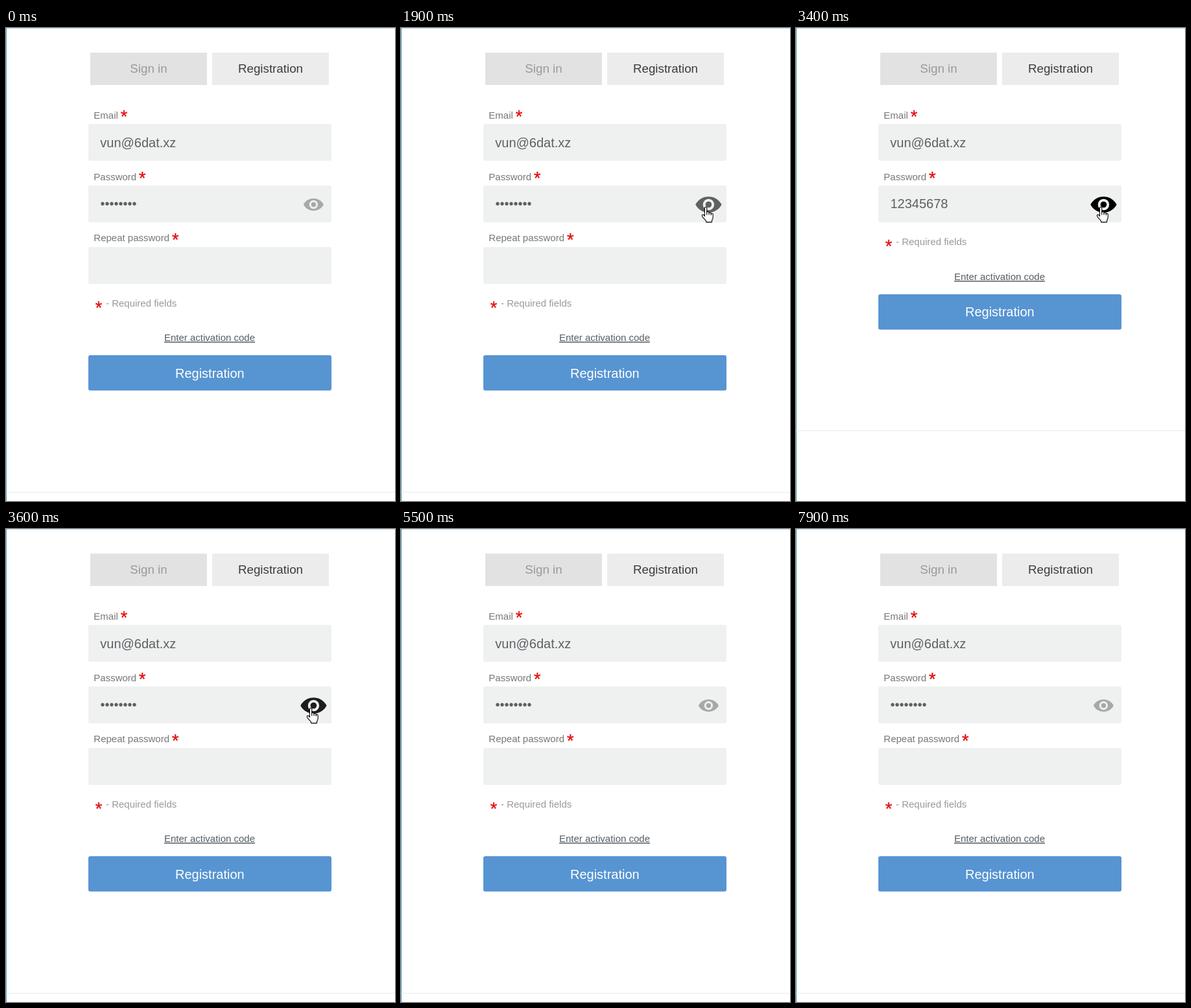
These frames come from a looping animation (600 px wide and 730 px high, 8000 ms). An HTML page:

```html
<!DOCTYPE html>
<html lang="en">
<head>
<meta charset="utf-8">
<title>Registration form</title>
<style>
html, body { margin: 0; width: 100%; height: 100%; overflow: hidden; background: #fff; }
svg { display: block; font: 15px "Liberation Sans", Arial, sans-serif; }
.big { font-size: 20px; fill: #5b6064; }
.tab { font-size: 18.75px; text-anchor: middle; }
.label { fill: #777; }
.star { font-size: 27px; fill: #e60f0f; stroke: #e60f0f; stroke-width: .4; text-anchor: middle; }
.mid { text-anchor: middle; }
.field { fill: #eff1f0; }
.pointer { fill: #fff; stroke: #000; stroke-width: 1.1; stroke-linejoin: round; }
</style>
</head>
<body>
<svg width="600" height="730" viewBox="0 0 600 730">
  <rect width="600" height="1" fill="#c3dfee"/>
  <rect width="1" height="730" fill="#5aa6cf"/>

  <rect x="130" y="38" width="180" height="50" fill="#e2e2e2"/>
  <rect x="318" y="38" width="180" height="50" fill="#ececec"/>
  <text class="tab" x="220" y="69" fill="#999">Sign in</text>
  <text class="tab" x="408" y="69" fill="#3c3c3c">Registration</text>

  <text class="label" x="135.3" y="140">Email</text>
  <text class="star" x="182" y="146">*</text>
  <rect class="field" x="127" y="148" width="375" height="57" rx="3"/>
  <text class="big" x="145.3" y="184">vun@6dat.xz</text>

  <text class="label" x="135.3" y="235">Password</text>
  <text class="star" x="210.3" y="241">*</text>
  <rect class="field" x="127" y="243" width="375" height="57" rx="3"/>
  <text class="big" x="145.5" y="278" id="password"></text>

  <g id="repeat">
    <text class="label" x="135.3" y="329">Repeat password</text>
    <text class="star" x="261.3" y="336">*</text>
    <rect class="field" x="127" y="338" width="375" height="57" rx="3"/>
  </g>

  <g id="action">
    <text class="mid" x="314" y="483" fill="#555d63" text-decoration="underline">Enter activation code</text>
    <rect x="127" y="505" width="375" height="54.6" rx="3" fill="#5794d2"/>
  </g>
  <g id="below">
    <text class="star" x="143" y="441">*</text>
    <text x="154" y="430" fill="#999">- Required fields</text>
    <text class="mid big" x="314.3" y="540" style="fill:#fff">Registration</text>
    <rect y="716" width="600" height="1" fill="#e9eaea"/>
  </g>

  <path id="eye" fill-rule="evenodd" d="M-15.5 0C-12.5-6-6.5-9.5 0-9.5S12.5-6 15.5 0C12.5 6 6.5 9.5 0 9.5S-12.5 6-15.5 0Z
    M-6.7 0a6.7 6.7 0 1 0 13.4 0a6.7 6.7 0 1 0-13.4 0Z M-3.7 0a3.7 3.7 0 1 0 7.4 0a3.7 3.7 0 1 0-7.4 0Z"/>

  <g id="hand" class="pointer">
    <path d="M-1.6 1.8Q-1.6.3 0 .3T1.7 1.8V8.2C2.2 7 4.8 7.2 5 8.7V9.4C5.6 8.3 8 8.6 8.2 10V10.7C9 9.8 11.2 10.2 11.2 12V16C11.2 19 9.6 20 9.5 21.5V23.6H.6V22C-1 19.5-4 17.5-5.5 14.4C-6.4 12.4-4.2 11.2-3 12.6L-1.6 14.4Z"/>
    <path d="M1.7 8v4.5M5 9v3.5M8.2 10.3v2.6" fill="none"/>
  </g>
  <path id="arrow" class="pointer" d="M.5.5V16.5L4.2 13L6.7 18.8L9 17.8L6.5 12.2H11.7Z"/>
</svg>
<script>
const LOOP = 8000, STEP = 100, FADE = 330;
const ENTER = 1000, OPEN = 2000, CLOSE = 3500, LEAVE = 4450;
const $ = id => document.getElementById(id);

const ramp = (t, start, length) => Math.min(1, Math.max(0, (t - start) / length));
const pulse = (t, start, end) => ramp(t, start, FADE) - ramp(t, end, FADE);
const place = (id, x, y) => $(id).setAttribute('transform', `translate(${x} ${y})`);
const show = (id, on) => $(id).setAttribute('visibility', on ? 'visible' : 'hidden');

function drawForm(t) {
  const open = t >= OPEN && t < CLOSE;
  $('password').textContent = open ? '12345678' : '•'.repeat(8);
  show('repeat', !open);
  place('action', 0, open ? -94 : 0);
  place('below', 0, open ? -95 : 0);
}

function drawEye(t) {
  const hover = pulse(t, ENTER, LEAVE), reveal = pulse(t, OPEN, CLOSE);
  $('eye').setAttribute('transform', `translate(474.4 272.5) scale(${1 + .3 * hover})`);
  $('eye').setAttribute('opacity', .3 + .3 * hover + .4 * reveal);
}

// The pointer slows down on its way in, drifts a little, then speeds away.
function drawPointer(t) {
  const away = (1 - ramp(t, 700, 350)) ** 2 + ramp(t, 4400, 200) ** 2;
  const drift = ramp(t, 1100, 800);
  const x = 472 - 2 * drift + 142 * away;
  const y = 271 + 5 * drift + 50 * away;
  const over = x < 494;
  place('hand', x, y);
  place('arrow', x, y);
  show('hand', over);
  show('arrow', !over);
}

function draw(t) {
  drawForm(t);
  drawEye(t);
  drawPointer(t);
}

function tick(now) {
  draw(Math.floor(now % LOOP / STEP) * STEP);
  requestAnimationFrame(tick);
}
draw(0);
requestAnimationFrame(tick);
</script>
</body>
</html>
```
